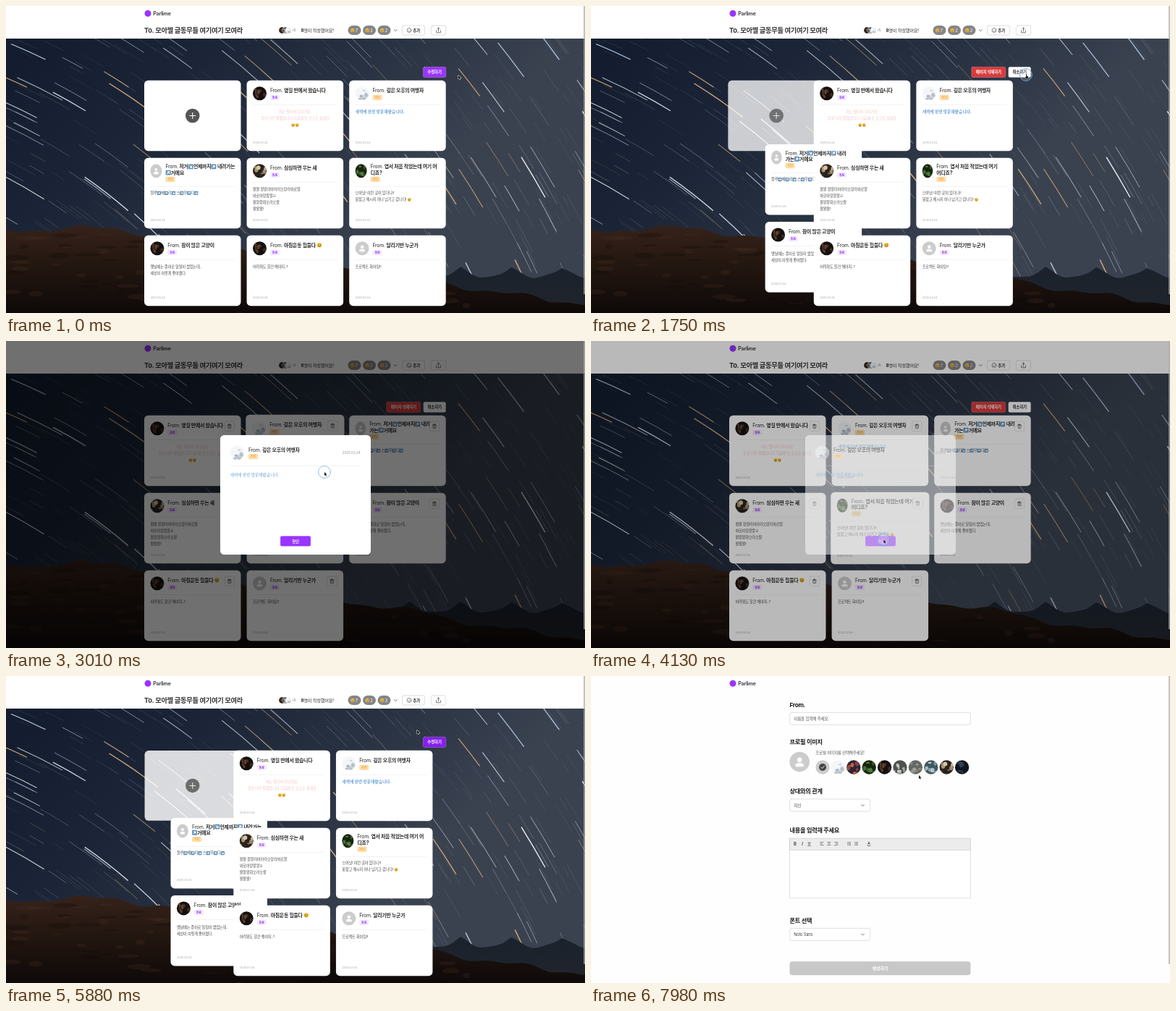
Write an HTML page with a canvas that moves like this. It is 800 px wide and 424 px high and loops after 8000 ms.

```html
<!DOCTYPE html>
<html lang="ko">
<head>
<meta charset="utf-8">
<title>Message board</title>
<style>
  html, body { margin: 0; width: 100%; height: 100%; overflow: hidden; background: #fff; }
  canvas { display: block; width: 100vw; height: 100vh; }
</style>
</head>
<body>
<canvas id="stage"></canvas>
<script>
const W = 800, H = 424, LOOP = 8000;
const SANS = 'Inter, "Noto Sans CJK KR", "Noto Sans CJK", "Noto Sans", sans-serif';
const SERIF = '"Noto Serif CJK KR", "Noto Serif", "Noto Sans CJK KR", serif';
const PURPLE = '#9935ff', INK = '#2b2b2b', BODY = '#4a4a4a', BLUE = '#4f8fd0';

const stage = document.getElementById('stage');
const dpr = Math.max(1, window.devicePixelRatio || 1);
stage.width = W * dpr;
stage.height = H * dpr;
let g = stage.getContext('2d');
g.scale(dpr, dpr);

// Moments when the page reacts to a click
const EDIT = 1658, OPEN = 2890, CLOSE = 4080, DONE = 5632, FORM = 6960;
const CLICKS = [EDIT, OPEN, CLOSE, DONE, 6720].map(t => t - 25);

// Where the pointer arrives, and when
const STOPS = [
  { at: 0, x: 625, y: 96 }, { at: 1500, x: 601, y: 95 }, { at: 2700, x: 440, y: 181 },
  { at: 3850, x: 404, y: 277 }, { at: 4560, x: 431, y: 88 }, { at: 5450, x: 592, y: 92 },
  { at: 5850, x: 568, y: 75 }, { at: 6560, x: 287, y: 147 }, { at: 7900, x: 453, y: 137 }
];

const clamp = (v, a = 0, b = 1) => Math.min(b, Math.max(a, v));
const mix = (a, b, k) => a + (b - a) * k;
const smooth = k => k * k * (3 - 2 * k);

// cubic-bezier(.4, 0, .1, 1)
function layoutEase(x) {
  if (x <= 0 || x >= 1) return clamp(x);
  let lo = 0, hi = 1;
  for (let i = 0; i < 24; i++) {
    const s = (lo + hi) / 2, r = 1 - s;
    if (1.2 * r * r * s + 0.3 * r * s * s + s * s * s < x) lo = s; else hi = s;
  }
  return smooth(lo);
}

function random(seed) {
  return () => {
    seed = (seed * 1664525 + 1013904223) >>> 0;
    return seed / 4294967296;
  };
}

function box(x, y, w, h, r, fill, line, lw = 0.6) {
  g.beginPath();
  g.roundRect(x, y, w, h, r);
  if (fill) { g.fillStyle = fill; g.fill(); }
  if (line) { g.strokeStyle = line; g.lineWidth = lw; g.stroke(); }
}

function oval(x, y, rx, ry, fill, line, lw = 0.6) {
  g.beginPath();
  g.ellipse(x, y, rx, ry, 0, 0, 7);
  if (fill) { g.fillStyle = fill; g.fill(); }
  if (line) { g.strokeStyle = line; g.lineWidth = lw; g.stroke(); }
}
const dot = (x, y, r, fill, line, lw) => oval(x, y, r, r, fill, line, lw);

function lines(points, color, lw) {
  g.beginPath();
  points.forEach(([x, y], i) => i ? g.lineTo(x, y) : g.moveTo(x, y));
  g.strokeStyle = color;
  g.lineWidth = lw;
  g.lineCap = g.lineJoin = 'round';
  g.stroke();
}

function setFont(size, weight, family = SANS) {
  g.font = `${weight} ${size}px ${family}`;
  g.letterSpacing = `${-0.035 * size}px`;
}

function smile(x, y, r) {
  dot(x, y, r, '#f6c344');
  for (const side of [-1, 1]) dot(x + side * r * 0.38, y - r * 0.2, r * 0.16, '#5b3a12');
  g.beginPath();
  g.arc(x, y + r * 0.1, r * 0.5, 0.2, 2.9);
  g.strokeStyle = '#5b3a12'; g.lineWidth = r * 0.2; g.stroke();
}

const TURN = { '↗': -Math.PI / 4, '↘': Math.PI / 4, '➡': 0 };
function arrowKey(x, y, s, turn) {
  g.save();
  g.translate(x, y);
  box(-s / 2, -s / 2, s, s, s * 0.15, '#5b8fb9');
  g.rotate(turn);
  const u = s * 0.3;
  lines([[-u, 0], [u, 0], [0, -u * 0.8], [u, 0], [0, u * 0.8]], '#fff', s * 0.15);
  g.restore();
}

// Draws text with its small pictograms; returns the x where it ends.
function text(str, x, y, size, color, weight = 400, align = 'left', family) {
  setFont(size, weight, family);
  g.textAlign = 'left';
  const parts = str.split(/([↗↘➡☺])/).filter(Boolean);
  const icon = p => p === '☺' || p in TURN;
  const wide = p => icon(p) ? size * 1.05 : g.measureText(p).width;
  const total = parts.reduce((sum, p) => sum + wide(p), 0);
  if (align === 'center') x -= total / 2;
  if (align === 'right') x -= total;
  for (const p of parts) {
    const w = wide(p);
    if (p === '☺') smile(x + w / 2, y - size * 0.35, size * 0.48);
    else if (p in TURN) arrowKey(x + w / 2, y - size * 0.35, size, TURN[p]);
    else { g.fillStyle = color; g.fillText(p, x, y); }
    x += w;
  }
  return x;
}

const TONES = {
  snow: ['#a9b3bd', '#f4f6f8'], camp: ['#d9663a', '#2b2438'], leaf: ['#5d8d48', '#16260f'],
  dark: ['#6e4833', '#15100f'], trees: ['#dcdcd6', '#4d5250'], road: ['#a5a89f', '#656962'],
  lake: ['#cfdce3', '#3f5a5f'], book: ['#ead6a8', '#2a221d'], night: ['#34465a', '#10151d']
};

function person(x, y, rx, ry) {
  oval(x, y, rx, ry, '#ccc');
  dot(x, y - ry * 0.2, rx * 0.24, '#fff');
  box(x - rx * 0.42, y + ry * 0.12, rx * 0.84, ry * 0.36, [rx * 0.35, rx * 0.35, 1, 1], '#fff');
}

function avatar(kind, x, y, rx, ry = rx) {
  if (kind === 'person') return person(x, y, rx, ry);
  const [patch, base] = TONES[kind], rnd = random(kind.length * 77 + kind.charCodeAt(0));
  g.save();
  oval(x, y, rx, ry, base);
  g.clip();
  for (let i = 0; i < 7; i++) {
    g.globalAlpha *= 0.9;
    oval(x + (rnd() - 0.5) * rx * 1.7, y + (rnd() - 0.4) * ry * 1.6,
      rx * (0.12 + rnd() * 0.22), ry * (0.1 + rnd() * 0.3), patch);
  }
  g.restore();
}

function shade(x0, y0, x1, y1, colors) {
  const fade = g.createLinearGradient(x0, y0, x1, y1);
  colors.forEach((c, i) => fade.addColorStop(i / (colors.length - 1), c));
  return fade;
}

function land(height, fill) {
  g.beginPath();
  g.moveTo(0, H);
  for (let x = 0; x <= W; x += 2) g.lineTo(x, height(x));
  g.lineTo(W, H);
  g.fillStyle = fill;
  g.fill();
}

// Star trails circle around a pole far below the left corner.
function paintStars(rnd) {
  const px = -324, py = 856, tints = ['#fff', '#e4ecf8', '#b4c8e6', '#fff', '#e9b981'];
  g.lineCap = 'round';
  for (let i = 0; i < 400; i++) {
    const x = rnd() * 860 - 50, y = 20 + rnd() * 370, power = rnd() ** 4;
    const r = Math.hypot(x - px, y - py), a = Math.atan2(y - py, x - px);
    g.globalAlpha = 0.22 + power * 0.7;
    g.strokeStyle = tints[i % tints.length];
    g.lineWidth = 0.4 + power;
    g.beginPath();
    g.arc(px, py, r, a, a + (12 + rnd() * 36 + power * 35) / r);
    g.stroke();
  }
  g.globalAlpha = 1;
}

const sky = document.createElement('canvas');
function paintSky() {
  sky.width = W * dpr;
  sky.height = H * dpr;
  const main = g, rnd = random(41);
  g = sky.getContext('2d');
  g.scale(dpr, dpr);
  g.fillStyle = shade(60, 40, 440, 400, ['#131d2f', '#1b2537', '#293242', '#3a4250']);
  g.fillRect(0, 0, W, H);
  paintStars(rnd);

  const peaks = x => 361 + 14 * Math.abs(Math.sin(Math.PI * (x - 628) / 70)) + Math.sin(x / 6);
  const slope = x => 308 + 100 * clamp((x - 150) / 600) ** 1.1 + 4 * Math.sin(x / 24) + 1.5 * Math.sin(x / 9);
  land(x => x < 500 ? H : peaks(x), shade(0, 360, 0, H, ['#1b222d', '#20242b']));
  land(slope, shade(0, 305, 0, H, ['#35221a', '#21150f', '#0e0909']));
  g.globalAlpha = 0.25;
  for (let i = 0; i < 90; i++) {
    const x = rnd() * 640, y = slope(x) + 8 + rnd() * 90;
    oval(x, y, 4 + rnd() * 14, 1 + rnd() * 3, i % 2 ? '#0a0605' : '#4a2f20');
  }
  g.globalAlpha = 1;
  g = main;
}

const CARDS = [
  { name: ['옆길 반에서 왔습니다'], face: 'dark', tag: '동료', style: 'pink',
    msg: ['저는 멀리서 다녀가요.', '항상 너무 잘했습니다 다음에 또 오고도 싶네요', '☺☺'] },
  { name: ['깊은 오후의 여행자'], face: 'snow', tag: '지인', style: 'serif', msg: ['새벽에 한번 방문해봤습니다.'] },
  { name: ['저거↘언제까지↗ 내려가는', '↗거에요'], edit: ['저거↘언제까지↗ 내려', '가는↗거에요'],
    face: 'person', tag: '지인', msg: ['블루➡베↗리↘ 스➡무↗디↘'] },
  { name: ['심심하면 우는 새'], face: 'book', tag: '동료',
    msg: ['왈왈 왕왕라아라라오랑라와로알', '와로아랑왕왕ㄹ', '왈왕왕롸오라오랄', '왈왈왈!'] },
  { name: ['엽서 처음 적었는데 여기 어', '디죠?'], edit: ['엽서 처음 적었는데 여기', '어디죠?'],
    face: 'leaf', tag: '지인', msg: ['으아닛! 이런 곳이 있다니!!', '못참고 메시지 하나 남기고 갑니다! ☺'] },
  { name: ['잠이 많은 고양이'], face: 'dark', tag: '동료',
    msg: ['옛날에는 종이로 일일이 썼었는데..', '세상이 이렇게 좋아졌다.'] },
  { name: ['아침운동 힘들다 ☺'], face: 'dark', tag: '동료', msg: ['어려워도 할건 해야지..?'] },
  { name: ['달리기반 누군가'], face: 'person', tag: '동료', msg: ['프로젝트 화이팅!!'] }
];
const CW = 133.5, CH = 97.5;
const slot = i => [191 + (i % 3) * 141.6, 102.7 + Math.floor(i / 3) * 107];
const DATE = '2025.03.24.';

function badge(label, x, y) {
  const near = label === '동료';
  box(x, y, 13, 7.2, 1.3, near ? '#f5eaff' : '#ffdda3');
  text(label, x + 6.5, y + 5.1, 4.1, near ? PURPLE : '#ee8a35', near ? 600 : 400, 'center');
}

function sender(name, x, y) {
  const end = text('From. ', x, y, 6.9, INK);
  text(name[0], end, y, 6.9, INK, 700);
  if (name[1]) text(name[1], x, y + 8.2, 6.9, INK, 700);
}

function trash(x, y) {
  box(x - 6.7, y - 6.7, 13.4, 13.4, 2, '#fff', '#ccc', 0.5);
  box(x - 2, y - 1.6, 4, 4.6, 0.6, null, '#444');
  box(x - 1, y - 2.8, 2, 1, 0.3, null, '#444', 0.5);
  lines([[x - 2.6, y - 1.8], [x + 2.6, y - 1.8]], '#444', 0.6);
  for (const side of [-0.6, 0.6]) lines([[x + side, y], [x + side, y + 1.7]], '#444', 0.4);
}

function panel(x, y, grow, paint) {
  g.save();
  g.translate(x + CW / 2, y + CH / 2);
  g.scale(grow, grow);
  g.translate(-CW / 2, -CH / 2);
  box(0, 0, CW, CH, 5.5, '#fff');
  paint();
  g.restore();
}

function drawCard(card, x, y, grow, editing, bin) {
  panel(x, y, grow, () => {
    const two = card.name.length > 1, drop = two ? 6 : 0;
    const left = !two ? 32.3 : editing ? 28 : 29.5;
    const rx = two ? (left - 13.5) / 2 : 9.5;
    avatar(card.face, 8.4 + rx, 18, rx, 9.5);
    sender(editing && card.edit || card.name, left, two ? 14.6 : 16);
    badge(card.tag, left, 20 + drop);
    box(8.4, 33.3 + drop, 117, 0.5, 0, '#e8e8e8');
    card.msg.forEach((line, i) => {
      const my = 45.7 + drop * 0.8 + i * 9;
      if (card.style === 'pink') text(line, CW / 2, my, 5.2, '#f4c4c4', 400, 'center');
      else if (card.style === 'serif') text(line, 8.4, my, 5.7, BLUE, 600, 'left', SERIF);
      else text(line, 8.4, my, 5.2, BODY);
    });
    text(DATE, 8.4, 87.2, 4, '#aaa');
    if (bin > 0) {
      g.globalAlpha *= bin;
      trash(117.8, 15);
    }
  });
}

function drawPlus(grow, alpha, shift) {
  const [x, y] = slot(0), cx = CW / 2, cy = CH / 2;
  g.globalAlpha = alpha;
  panel(x + shift, y, grow, () => {
    dot(cx, cy, 9.8, '#555');
    lines([[cx - 4, cy], [cx + 4, cy]], '#fff', 1.1);
    lines([[cx, cy - 4], [cx, cy + 4]], '#fff', 1.1);
  });
  g.globalAlpha = 1;
}

function brand() {
  dot(196, 10.3, 4.5, PURPLE);
  text('Parlime', 203.3, 13, 7.1, '#4a494f', 700);
}

const chevron = (x, y) => lines([[x - 2, y - 1], [x, y + 1], [x + 2, y - 1]], '#555', 0.8);

function faceIcon(x, y) {
  dot(x, y, 3, null, '#444');
  for (const side of [-1, 1]) dot(x + side, y - 0.7, 0.4, '#444');
  lines([[x - 1.4, y + 0.9], [x, y + 1.7], [x + 1.4, y + 0.9]], '#444', 0.5);
}

function shareIcon(x, y) {
  lines([[x - 2.9, y], [x - 2.9, y + 3], [x + 2.9, y + 3], [x + 2.9, y]], '#444', 0.7);
  lines([[x, y + 1.2], [x, y - 3.8]], '#444', 0.7);
  lines([[x - 1.7, y - 2.1], [x, y - 3.8], [x + 1.7, y - 2.1]], '#444', 0.7);
}

function drawHeader() {
  g.fillStyle = '#fff';
  g.fillRect(0, 0, W, 45);
  brand();
  text('To. 모아별 글동무들 여기여기 모여라', 191, 37.1, 9.3, '#333', 700);
  ['dark', 'trees', 'snow'].forEach((kind, i) => {
    dot(381.5 + i * 4.6, 33.5, 4.7, '#fff');
    avatar(kind, 381.5 + i * 4.6, 33.5, 4.3);
  });
  dot(397.5, 33.5, 4.6, '#fff');
  text('+5', 395.3, 35.4, 4.2, '#555');
  text('명이 작성했어요!', text('8', 407.5, 35.8, 6.2, INK, 700), 35.8, 6.2, INK);
  ['7', '2', '2'].forEach((n, i) => {
    const x = 472.5 + i * 20.5;
    box(x, 27, 18, 13, 6.5, '#858585');
    smile(x + 6.2, 33.5, 2.6);
    text(n, x + 10.3, 35.7, 5.8, '#fff');
  });
  chevron(538.3, 33.7);
  box(547.5, 27, 31, 13, 2, '#fff', '#ccc');
  faceIcon(557, 33.5);
  text('추가', 562.3, 35.5, 5.5, INK, 600);
  box(583, 28.5, 0.4, 10, 0, '#eee');
  box(587.3, 27, 20.4, 13, 2, '#fff', '#ccc');
  shareIcon(597.5, 33.8);
}

function button(label, x, y, w, fill, ink) {
  box(x, y, w, 14.3, 2, fill, 'rgba(255,255,255,.35)');
  text(label, x + w / 2, y + 9.2, 5.5, ink, 600, 'center');
}

function drawModal(alpha) {
  const card = CARDS[1];
  g.globalAlpha = alpha;
  g.fillStyle = 'rgba(0,0,0,.56)';
  g.fillRect(0, 0, W, H);
  box(296, 130, 208, 165, 5.5, '#fff');
  avatar(card.face, 319.5, 154.5, 9.8);
  sender(card.name, 335, 152.6);
  badge(card.tag, 335, 156);
  text(DATE, 490.5, 156.3, 4.9, '#999', 400, 'right');
  box(309.5, 172, 181, 0.5, 0, '#e8e8e8');
  text(card.msg[0], 309.5, 186.7, 5.7, BLUE, 400, 'left', SERIF);
  button('확인', 379, 269.3, 42, PURPLE, '#fff');
  g.globalAlpha = 1;
}

// The pointer rests for the first third of the way to its next stop.
function pointer(t) {
  const next = STOPS.findIndex(s => s.at > t);
  if (next < 1) return next ? [STOPS.at(-1).x, STOPS.at(-1).y] : [STOPS[0].x, STOPS[0].y];
  const a = STOPS[next - 1], b = STOPS[next], leave = mix(a.at, b.at, 0.35);
  const k = smooth(clamp((t - leave) / (b.at - leave)));
  return [mix(a.x, b.x, k), mix(a.y, b.y, k)];
}

const inside = ([px, py], x, y, w, h) => px > x && px < x + w && py > y && py < y + h;

// Averaging the recent past gives the hover its soft start and end.
function hover(t, x, y) {
  if (t > OPEN && t < CLOSE) t = OPEN;
  let sum = 0;
  for (let k = 0; k < 8; k++) sum += inside(pointer(Math.max(0, t - k * 25)), x, y, CW, CH) ? 1 : 0;
  return 1 + 0.02 * smooth(sum / 8);
}

const ARROW = new Path2D('M0 0V5L1.2 4 2 5.8 2.8 5.4 2 3.7 3.5 3.6Z');
const HAND = new Path2D('M0-1H.9V1.4L3 1.9 2.8 4.6 2 5.6H.2L-1.4 3.4-1 2.8 0 3.4Z');

function drawPointer(t) {
  const spot = pointer(t), [x, y] = spot;
  for (const click of CLICKS) {
    const age = t - click;
    if (age < 0 || age > 200) continue;
    g.globalAlpha = 1 - Math.max(0, age - 110) / 120;
    dot(x, y, 8.5, 'rgba(255,255,255,.15)', '#69a7e6', 1);
    g.globalAlpha = 1;
  }
  const overPlus = t > DONE && inside(spot, ...slot(0), CW, CH);
  const overButton = inside(spot, 525, 84, 83, 15);
  const shape = t < FORM && (overPlus || overButton) ? HAND : ARROW;
  g.save();
  g.translate(x, y);
  g.strokeStyle = '#fff';
  g.lineWidth = 0.9;
  g.stroke(shape);
  g.fillStyle = '#111';
  g.fill(shape);
  g.restore();
}

function drawBoard(t) {
  g.drawImage(sky, 0, 0, W, H);
  drawHeader();

  const editing = t >= EDIT && t < DONE;
  const move = layoutEase((t - EDIT) / 450) - layoutEase((t - DONE) / 450);
  const bin = editing ? clamp((t - EDIT - 200) / 200) : 0;
  if (editing) {
    button('페이지 삭제하기', 525.8, 84.2, 47, '#dc3a3a', '#fff');
    button('취소하기', 576.8, 84.2, 30.8, '#fff', INK);
  } else {
    const over = inside(pointer(t), 576, 84, 32, 15) || (t > DONE && t < DONE + 330);
    button('수정하기', 576.4, 84.2, 31.3, over ? '#861dee' : PURPLE, '#fff');
  }

  const grow = hover(t, ...slot(0));
  if (t < DONE) {
    const out = clamp((t - EDIT) / 400);
    if (out < 1) drawPlus(out ? 1 : grow, 1 - out, -7 * out);
  } else {
    const come = clamp((t - DONE) / 300);
    drawPlus(mix(0.95, 1, come) * grow, come, 0);
  }

  // Cards that change rows pass beneath the others.
  const order = [...CARDS.keys()].sort((a, b) => (b % 3 === 2) - (a % 3 === 2));
  for (const i of order) {
    const [x0, y0] = slot(i + 1), [x1, y1] = slot(i);
    const x = mix(x0, x1, move), y = mix(y0, y1, move);
    const still = move === 0 || move === 1;
    drawCard(CARDS[i], x, y, still ? hover(t, x, y) : 1, editing, bin);
  }
  const modal = clamp((t - OPEN) / 100) - clamp((t - CLOSE) / 100);
  if (modal > 0) drawModal(modal);
}

const heading = (label, y) => text(label, 274.5, y, 8.2, '#181818', 700);

function select(label, y) {
  box(274.7, y, 111, 17, 2.8, '#fff', '#ccc');
  text(label, 280.2, y + 10.6, 5.7, '#444');
  chevron(375.5, y + 8.7);
}

function rowsIcon(x, side, bullets) {
  for (let i = 0; i < 3; i++) {
    const y = 229.4 + i * 1.9, w = i % 2 && !bullets ? 3 : 5;
    box(x + (5 - w) * side, y, w, 0.7, 0, '#555');
    if (bullets) box(x + 1, y, 0.7, 0.7, 0, '#ececec');
  }
}

function drawTools() {
  box(274.7, 224.3, 249.8, 82.5, 0, '#fff', '#ccc');
  box(274.7, 224.3, 249.8, 16.2, 0, '#ececec', '#ccc');
  text('B', 280, 233.5, 5.8, '#444', 700);
  text('I', 291.2, 233.5, 5.8, '#444', 'italic 600');
  text('U', 299.6, 233.2, 5.4, '#444', 600);
  text('A', 382, 233.2, 5.4, '#444', 600);
  for (const x of [299.3, 381.8]) box(x, 234, 4.4, 0.7, 0, '#444');
  for (let i = 0; i < 3; i++) rowsIcon(316.5 + i * 9.9, i / 2, false);
  for (let i = 0; i < 2; i++) rowsIcon(354 + i * 10, 0, true);
}

function drawForm() {
  g.fillStyle = '#fefefe';
  g.fillRect(0, 0, W, H);
  brand();
  heading('From.', 43);
  box(274.7, 50.4, 249.8, 17, 2.8, '#fff', '#ccc');
  text('이름을 입력해 주세요.', 280.2, 61, 5.6, '#555');

  heading('프로필 이미지', 94);
  person(288.2, 118.6, 13.8, 13.8);
  text('프로필 이미지를 선택해주세요!', 310.3, 108, 5.5, '#555');
  const first = 320, y = 126;
  dot(first, y, 9.7, '#ccc');
  dot(first, y, 5, '#444');
  lines([[first - 2.2, y], [first - 0.6, y + 1.7], [first + 2.3, y - 1.6]], '#fff', 0.9);
  Object.keys(TONES).forEach((kind, i) => avatar(kind, first + (i + 1) * 21.4, y, 9.7));

  heading('상대와의 관계', 162.3);
  select('지인', 170);
  heading('내용을 입력해 주세요', 216.3);
  drawTools();
  heading('폰트 선택', 340.7);
  select('Noto Sans', 348.4);
  box(274.5, 394.2, 250, 19, 4, '#c8c8c8');
  text('생성하기', 399.5, 406, 6.2, '#fff', 700, 'center');
}

function frame(now) {
  const t = now % LOOP;
  g.clearRect(0, 0, W, H);
  if (t < FORM) drawBoard(t); else drawForm();
  box(798.3, 0, 1.4, 398, 0, '#a9a9a9');
  drawPointer(t);
}

paintSky();
const begin = performance.now();
frame(0);
requestAnimationFrame(function tick(now) {
  frame(Math.max(0, now - begin));
  requestAnimationFrame(tick);
});
</script>
</body>
</html>
```
